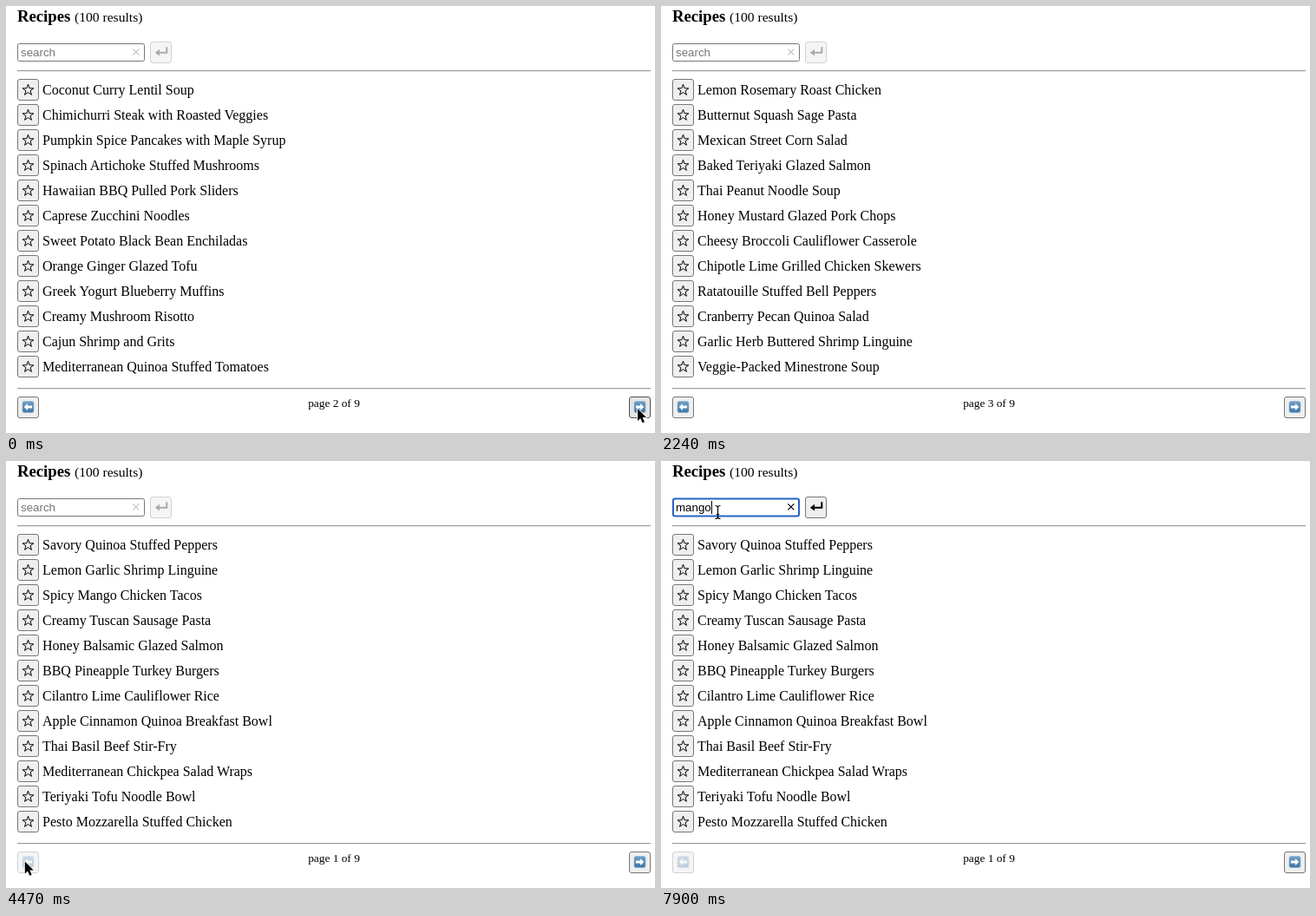
Animation, 748 px wide and 492 px high, one loop 8000 ms. Source, as an HTML page:

```html
<!DOCTYPE html>
<html lang="en">
<head>
<meta charset="utf-8">
<title>Recipes</title>
<style>
  html, body { margin: 0; width: 100%; height: 100%; overflow: hidden; background: #fff; }
  svg { display: block; }
  text { font: 16px "Liberation Serif", "Times New Roman", Times, serif; }
  .title { font-size: 18.72px; font-weight: bold; }
  .count { font-size: 15.6px; }
  .page { font-size: 13.333px; text-anchor: middle; }
  .field { font: 13.333px "Liberation Sans", Arial, sans-serif; }
  .box { fill: #efefef; stroke: #767676; }
  .hover .box { fill: #e5e5e5; stroke: #4f4f4f; }
  .pressed .box { fill: #f5f5f5; stroke: #8d8d8d; }
  .disabled .box { fill: #f5f5f5; stroke: #d1d1d1; }
  .disabled .icon { opacity: .3; }
</style>
</head>
<body>
<svg id="stage" width="748" height="492" viewBox="0 0 748 492">
  <defs>
    <radialGradient id="moonFill" cx=".42" cy=".38" r=".65">
      <stop offset="0" stop-color="#ffe83d"/>
      <stop offset=".65" stop-color="#fbd31f"/>
      <stop offset="1" stop-color="#e9ae12"/>
    </radialGradient>
    <linearGradient id="tileFill" x2="0" y2="1">
      <stop offset="0" stop-color="#6f9fc6"/>
      <stop offset="1" stop-color="#3f77a8"/>
    </linearGradient>
  </defs>
</svg>
<script>
const LOOP = 8000;
const PAGES = {
  1: ["Savory Quinoa Stuffed Peppers", "Lemon Garlic Shrimp Linguine", "Spicy Mango Chicken Tacos",
    "Creamy Tuscan Sausage Pasta", "Honey Balsamic Glazed Salmon", "BBQ Pineapple Turkey Burgers",
    "Cilantro Lime Cauliflower Rice", "Apple Cinnamon Quinoa Breakfast Bowl", "Thai Basil Beef Stir-Fry",
    "Mediterranean Chickpea Salad Wraps", "Teriyaki Tofu Noodle Bowl", "Pesto Mozzarella Stuffed Chicken"],
  2: ["Coconut Curry Lentil Soup", "Chimichurri Steak with Roasted Veggies",
    "Pumpkin Spice Pancakes with Maple Syrup", "Spinach Artichoke Stuffed Mushrooms",
    "Hawaiian BBQ Pulled Pork Sliders", "Caprese Zucchini Noodles", "Sweet Potato Black Bean Enchiladas",
    "Orange Ginger Glazed Tofu", "Greek Yogurt Blueberry Muffins", "Creamy Mushroom Risotto",
    "Cajun Shrimp and Grits", "Mediterranean Quinoa Stuffed Tomatoes"],
  3: ["Lemon Rosemary Roast Chicken", "Butternut Squash Sage Pasta", "Mexican Street Corn Salad",
    "Baked Teriyaki Glazed Salmon", "Thai Peanut Noodle Soup", "Honey Mustard Glazed Pork Chops",
    "Cheesy Broccoli Cauliflower Casserole", "Chipotle Lime Grilled Chicken Skewers",
    "Ratatouille Stuffed Bell Peppers", "Cranberry Pecan Quinoa Salad",
    "Garlic Herb Buttered Shrimp Linguine", "Veggie-Packed Minestrone Soup"]
};

// Stepped tracks: [start time, value]
const PAGE = [[0, 2], [1350, 3], [3420, 2], [4470, 1]];
const PRESSED = [[0, ""], [1050, "next"], [1200, ""], [3120, "prev"], [3270, ""], [4320, "prev"], [4470, ""]];
const LOADING = [[0, false], [1200, true], [1350, false], [3270, true], [3420, false]];
const TYPED = [[0, ""], [7160, "m"], [7310, "ma"], [7460, "man"], [7900, "mango"]];
const CARET = [[0, false], [5670, true], [6270, false], [6710, true]];
const CURSOR = [
  [0, [728, 464]], [1800, [712, 461]], [1950, [478, 450]], [2090, [164.5, 447]], [2240, null],
  [2540, [1, 466]], [2690, [9, 465.5]], [2840, [17, 464.5]], [2980, [20.8, 463.8]], [4020, [21.8, 461.5]],
  [4770, [23, 452]], [4920, [40, 372]], [5070, [66, 222]], [5220, [73, 104]],
  [5370, [68, 63]], [5520, [66.5, 59]], [5820, [65.5, 59]]
];
const at = (track, t) => track.findLast(([start]) => start <= t)[1];

const stage = document.getElementById("stage");
function add(parent, tag, attrs = {}, content = "") {
  const node = document.createElementNS("http://www.w3.org/2000/svg", tag);
  for (const key in attrs) node.setAttribute(key, attrs[key]);
  node.textContent = content;
  return parent.appendChild(node);
}
const label = (parent, x, y, cls, content) => add(parent, "text", { x, y, class: cls }, content);
const show = (node, on) => node.setAttribute("visibility", on ? "visible" : "hidden");

function button(parent, x, y) {
  const g = add(parent, "g", { transform: `translate(${x} ${y})` });
  add(g, "rect", { class: "box", x: .5, y: .5, width: 24, height: 24, rx: 2.5 });
  return g;
}
function rule(parent, y) {
  add(parent, "rect", { x: 13, y, width: 730, height: 1, fill: "#9a9a9a" });
  add(parent, "rect", { x: 13, y: y + 1, width: 730, height: 1, fill: "#eee" });
}
function arrowButton(parent, x, flip) {
  const g = button(parent, x, 450);
  const icon = add(g, "g", { class: "icon", transform: `translate(12.5 12) scale(${flip} 1)` });
  add(icon, "rect", { x: -6.5, y: -6.5, width: 13, height: 13, rx: 2, fill: "url(#tileFill)", stroke: "#8fb2cf", "stroke-width": .6 });
  add(icon, "path", { d: "M-4.8 0L-.6-4V-1.6H4.6V1.6H-.6V4Z", fill: "#fff" });
  return g;
}
function starPoints(cx, cy) {
  return Array.from({ length: 10 }, (_, i) => {
    const r = i % 2 ? 2.7 : 6.7, a = i * Math.PI / 5;
    return `${(cx + r * Math.sin(a)).toFixed(2)},${(cy - r * Math.cos(a)).toFixed(2)}`;
  }).join(" ");
}

label(stage, 13, 18, "title", "Recipes");
label(stage, 79, 18, "count", "(100 results)");
const moon = add(stage, "circle", { cx: 170, cy: 12, r: 7.6, fill: "url(#moonFill)" });

// Everything in this group drops half a pixel while loading
const body = add(stage, "g");
const field = add(body, "rect", { fill: "#fff" });
const enter = button(body, 166, 41);
add(enter, "path", { class: "icon", d: "M18.3 6.2H20.3V13.7H11V16.6L5.8 12.7L11 8.8V11.7H18.3Z" });
rule(body, 74);
const rows = PAGES[1].map((_, i) => {
  const y = 84 + 29 * i;
  const g = button(body, 13, y);
  add(g, "polygon", { points: starPoints(12.5, 12.9), fill: "none", stroke: "#000", "stroke-width": 1 });
  return label(body, 42, y + 18, "", "");
});
rule(body, 440);
const nav = { prev: arrowButton(body, 13, 1), next: arrowButton(body, 718, -1) };

const query = label(stage, 17, 58, "field", "");
const clear = add(stage, "path", { d: "M146.3 49.3L153.3 56.3M153.3 49.3L146.3 56.3", "stroke-width": 1.2 });
const caret = add(stage, "rect", { y: 46, width: 1, height: 15 });
const pageLabel = label(stage, 378, 462, "page", "");

const arrow = add(stage, "path", {
  d: "M0 0V14L3.2 11L5.5 16.3L7.9 15.3L5.6 10.1H10Z",
  stroke: "#fff", "stroke-width": 1.6, "stroke-linejoin": "round", "paint-order": "stroke"
});
const beam = add(stage, "path", {
  d: "M-3-7.5Q0-7.5 0-5.5Q0-7.5 3-7.5M0-6V6M-3 7.5Q0 7.5 0 5.5Q0 7.5 3 7.5M-1.8 2.5H1.8",
  fill: "none", stroke: "#000", "stroke-width": 1.2
});

const inside = (p, x, y, w, h) => !!p && p[0] >= x && p[0] <= x + w && p[1] >= y && p[1] <= y + h;

function setField(focused, hovered) {
  const width = focused ? 2 : 1, half = width / 2, top = focused ? 42.5 : 43;
  const attrs = {
    x: 13 + half, y: top + half, width: 147 - width, height: 107 - 2 * top - width, rx: 2,
    stroke: focused ? "#2463c8" : hovered ? "#383838" : "#767676", "stroke-width": width
  };
  for (const key in attrs) field.setAttribute(key, attrs[key]);
}

function render(t) {
  const page = at(PAGE, t), loading = at(LOADING, t), pressed = at(PRESSED, t);
  const typed = at(TYPED, t), cursor = at(CURSOR, t);
  const overField = inside(cursor, 13, 43, 147, 21);

  show(moon, loading);
  body.setAttribute("transform", `translate(0 ${loading ? .5 : 0})`);
  rows.forEach((row, i) => row.textContent = PAGES[page][i]);
  pageLabel.textContent = `page ${page} of 9`;

  for (const name in nav) {
    const off = loading || (name === "prev" && page === 1);
    const hover = inside(cursor, name === "prev" ? 13 : 718, 450, 25, 25);
    nav[name].setAttribute("class", off ? "disabled" : pressed === name ? "pressed" : hover ? "hover" : "");
  }

  setField(t >= 5670, overField);
  query.textContent = typed || "search";
  query.setAttribute("fill", typed ? "#000" : "#757575");
  clear.setAttribute("stroke", typed ? "#000" : "#c4c4c4");
  enter.setAttribute("class", typed ? "" : "disabled");
  caret.setAttribute("x", Math.round(17 + (typed ? query.getComputedTextLength() : 0)));
  show(caret, at(CARET, t));

  show(arrow, cursor && !overField);
  show(beam, overField);
  if (cursor) (overField ? beam : arrow).setAttribute("transform", `translate(${cursor})`);
}

const start = performance.now();
function tick() {
  render((performance.now() - start) % LOOP);
  requestAnimationFrame(tick);
}
tick();
</script>
</body>
</html>
```
